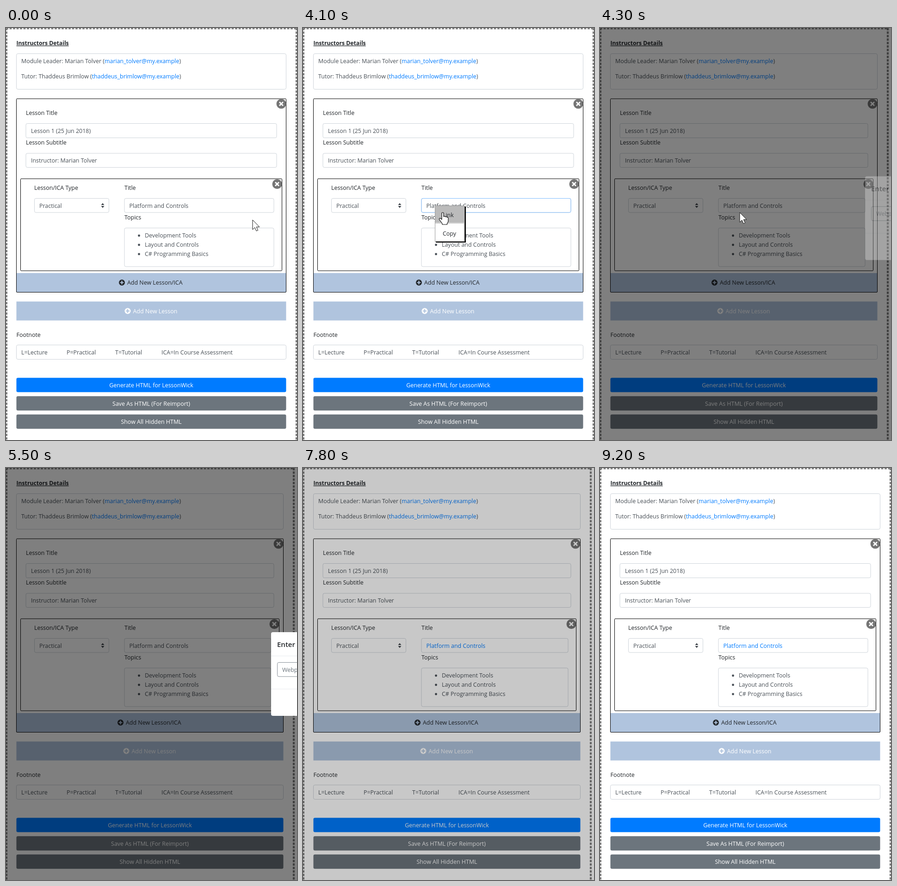
Write an HTML page that moves like this. It is 629 by 891 pixels and loops after 10000 ms.

```html
<!DOCTYPE html>
<html lang="en">
<head>
<meta charset="utf-8">
<title>Lesson editor</title>
<style>
html, body { margin: 0; width: 100%; height: 100%; overflow: hidden; background: #fff; }
svg { display: block; width: 629px; height: 891px; }
text { font: 12.45px "Open Sans", "Noto Sans", sans-serif; fill: #212529; white-space: pre; }
.mid { text-anchor: middle; }
.value { fill: #495057; }
.link { fill: #007bff; }
.light { fill: #fff; }
.head { font-size: 12.2px; font-weight: 700; text-decoration: underline; }
.modal-title { font-size: 15px; font-weight: 600; }
.hint { fill: #6c757d; }
</style>
</head>
<body>
<svg id="stage" viewBox="0 0 629 891"></svg>
<script>
const LOOP = 10000, STEP = 100;
const TITLE = "Platform and Controls";
const stage = document.getElementById("stage");

const text = (x, y, str, cls = "") => `<text x="${x}" y="${y}" class="${cls}">${str}</text>`;
const rect = (x, y, right, bottom, attrs) =>
  `<rect x="${x}" y="${y}" width="${right - x}" height="${bottom - y}" ${attrs}/>`;
const field = (x, y, right, bottom, stroke = "#ced4da") =>
  rect(x, y, right, bottom, `rx="3.3" fill="#fff" stroke="${stroke}"`);
const frame = (x, y, right, bottom) => rect(x, y, right, bottom, 'rx="1.5" fill="none" stroke="#000"');
const closeIcon = (x, y) => `<circle cx="${x}" cy="${y}" r="10.5" fill="#757575"/>
  <path d="M${x - 4} ${y - 4}l8 8m0-8l-8 8" stroke="#fff" stroke-width="2.8"/>`;
const plusIcon = (x, y, disc, cross) => `<circle cx="${x}" cy="${y}" r="6.5" fill="${disc}"/>
  <path d="M${x - 4} ${y}h8m-4-4v8" stroke="${cross}" stroke-width="2.2"/>`;

// The whole form; its right edge depends on whether the scroll bar is compensated.
function page(right) {
  const edge = right - .5, mid = (22 + right) / 2, steel = "#b0c4de";
  const button = (y, label, fill) =>
    rect(22.5, y, edge, y + 31, `rx="3.3" fill="${fill}"`) + text(mid, y + 20.3, label, "mid light");
  const person = (y, role, name, mail) =>
    text(33, y, `${role}: ${name} (<tspan class="link">${mail}</tspan>)`, "value");
  const topic = (label, i) =>
    `<circle cx="287.5" cy="${449 + i * 20}" r="2.4" fill="#495057"/>` + text(300, 453 + i * 20, label, "value");
  const notes = [[33, "L=Lecture"], [131, "P=Practical"], [236, "T=Tutorial"], [336, "ICA=In Course Assessment"]];
  return `
    <path d="M0 .6H${right + 24}M.9 0V891M${right + 22} 0V891" fill="none" stroke="#808080"
      stroke-width="4.2" stroke-dasharray="5 2.5"/>
    ${text(22.5, 37, "Instructors Details", "head")}
    ${field(22.5, 55.5, edge, 132.5)}
    ${person(76, "Module Leader", "Marian Tolver", "marian_tolver@my.example")}
    ${person(109, "Tutor", "Thaddeus Brimlow", "thaddeus_brimlow@my.example")}
    ${rect(22.5, 530, edge, 571.5, `fill="${steel}"`)}
    ${frame(22.5, 153, edge, 571.5)}
    ${closeIcon(right - 11, 164)}
    ${text(43, 188, "Lesson Title")}
    ${field(43, 206.5, right - 21, 237.5)}
    ${text(54, 227, "Lesson 1 (25 Jun 2018)", "value")}
    ${text(43, 252.3, "Lesson Subtitle")}
    ${field(43, 271, right - 21, 301.5)}
    ${text(54, 291, "Instructor: Marian Tolver", "value")}
    ${frame(31.5, 326, right - 9.5, 525)}
    ${text(61, 350, "Lesson/ICA Type")}
    ${field(61.5, 368.5, 222.5, 399)}
    ${text(72, 388.5, "Practical", "value")}
    <path d="M205.5 382.8l3.5-4 3.5 4zM205.5 385l3.5 4 3.5-4z" fill="#343a40"/>
    ${text(256, 350, "Title")}
    ${field(256, 368.5, right - 27, 399)}
    ${text(266.5, 388.5, TITLE, "value title")}
    ${text(256, 414.3, "Topics")}
    ${field(256, 432.5, right - 27, 516)}
    ${["Development Tools", "Layout and Controls", "C# Programming Basics"].map(topic).join("")}
    ${closeIcon(right - 20, 337.5)}
    ${plusIcon(mid - 63.5, 550.5, "#212529", steel)}
    ${text(mid - 52, 555.2, "Add New Lesson/ICA")}
    ${rect(22.5, 591.5, edge, 632.5, `fill="${steel}"`)}
    ${plusIcon(mid - 51, 612, "#fff", steel)}
    ${text(mid - 39.5, 617, "Add New Lesson", "light")}
    ${text(22.5, 667.5, "Footnote")}
    ${field(22.5, 685.5, edge, 716.5)}
    ${notes.map(([x, str]) => text(x, 706.3, str, "value")).join("")}
    ${button(756.5, "Generate HTML for LessonWick", "#007bff")}
    ${button(796.2, "Save As HTML (For Reimport)", "#6c757d")}
    ${button(835.8, "Show All Hidden HTML", "#6c757d")}`;
}

stage.innerHTML = `
  <defs><clipPath id="picked"><rect id="pickArea" y="375.5" height="17.5"/></clipPath></defs>
  <rect width="629" height="891" fill="#fff"/>
  <g id="wide">${page(606)}</g>
  <g id="narrow">${page(600)}</g>
  <g fill="none">
    <rect id="halo" x="254.7" y="367.2" width="325.6" height="33.1" rx="4.5" stroke="#007bff"
      stroke-opacity=".25" stroke-width="2.6"/>
    <rect id="ring" x="256" y="368.5" width="323" height="30.5" rx="3.3" stroke="#80bdff"/>
  </g>
  <g id="selection" clip-path="url(#picked)">
    ${rect(260, 375, 400, 394, 'fill="#3390ff"')}${text(266.5, 388.5, TITLE, "light")}
  </g>
  <g id="menu">
    ${rect(287, 386, 352, 464, 'fill="#000"')}
    ${rect(285.5, 384.5, 349, 461.5, 'fill="#fff" stroke="#999"')}
    <rect id="hover" x="286" y="385" width="62.5" height="36.5" fill="#bbb"/>
    <path d="M286 422.5H348.5" stroke="#ccc"/>
    ${text(302, 409, "Link")}${text(302, 449.3, "Copy")}
  </g>
  <rect id="shade" width="629" height="891"/>
  <g id="modal">
    ${rect(573, 355, 985, 536, 'rx="4" fill="#fff"')}
    ${text(586, 387, "Enter Webpage URL", "modal-title")}
    <path d="M573 406.5H985M573 478H985" stroke="#e9ecef"/>
    ${field(586.5, 420.5, 970, 451, "#868e96")}
    <g id="hint">${text(597, 440.8, "Webpage URL", "hint")}</g>
    <g id="typed">${text(597, 440.8, "https://", "value")}</g>
  </g>
  <g id="pointer" stroke-linejoin="round">
    <path id="arrow" d="M0 0V21L4.8 16.5 8.2 24 11.6 22.5 8.3 15.2H14.8Z" fill="#fff" stroke="#111"/>
    <path id="beam" d="M-2.7-6.5H-.6L0-6 .6-6.5H2.7M0-6V6.5M-2.7 7H-.6L0 6.5 .6 7H2.7" fill="none" stroke="#111" stroke-width="1.2"/>
    <path id="hand" d="M-2 15V2Q-2 0 0 0T2 2V9Q4 7 6 9.500 8 8 9.500 10.500 12 9.500 12 13V18Q12 21 9.500 24V26H-1V24L-7.500 15Q-8 12-5 12.500Z"
      fill="#fff" stroke="#111" stroke-width="1.2"/>
  </g>`;

const el = Object.fromEntries([...stage.querySelectorAll("[id]")].map(node => [node.id, node]));
const titles = [...stage.querySelectorAll(".title")];

const clamp = v => Math.min(1, Math.max(0, v));
const ramp = (t, start, length) => clamp((t - start) / length);
const smooth = p => p * p * (3 - 2 * p);
const easeOut = p => 1 - (1 - p) ** 1.8;
const show = (node, on) => node.setAttribute("display", on ? "inline" : "none");
const fade = (node, amount) => { show(node, amount > 0); node.setAttribute("opacity", amount); };

// Moments of the dialog's life, in ms
const OPEN = 4118, MODAL_IN = 4258, MODAL_OUT = 7565, SHADE_OUT = 7715, CLOSED = 7865;

// Pointer stops: time, x, y
const stops = [
  [0, 533, 415], [1200, 533, 415], [1800, 398, 386], [1950, 398, 386], [2350, 261, 388],
  [2700, 261, 388], [3000, 285, 384], [3100, 285, 384], [3400, 302, 399], [4500, 302, 399],
  [5100, 645, 440], [LOOP, 645, 440]
];
function pointerAt(t) {
  const i = stops.findIndex(stop => stop[0] > t);
  const [t0, x0, y0] = stops[i - 1], [t1, x1, y1] = stops[i];
  const p = smooth((t - t0) / (t1 - t0));
  return [x0 + (x1 - x0) * p, y0 + (y1 - y0) * p];
}

function draw(t) {
  const [x, y] = pointerAt(t);
  const menuOpen = t >= 3050 && t < OPEN;
  const modalUp = t >= OPEN && t < CLOSED;

  show(el.wide, !modalUp);
  show(el.narrow, modalUp);
  titles.forEach(node => node.setAttribute("class", t >= MODAL_OUT ? "link title" : "value title"));

  const focus = ramp(t, 1900, 150);
  fade(el.halo, focus * (1 - ramp(t, 3950, 150)));
  fade(el.ring, t < OPEN ? focus : 0);

  const pickFrom = Math.max(266.5, t < 2350 ? x : 0);
  show(el.selection, t >= 1950 && t < 4050);
  el.pickArea.setAttribute("x", pickFrom);
  el.pickArea.setAttribute("width", Math.max(0, 395 - pickFrom));

  const overMenu = menuOpen && x > 287;
  show(el.menu, menuOpen);
  show(el.hover, overMenu);

  fade(el.shade, .5 * ramp(t, OPEN, 150) * (1 - ramp(t, SHADE_OUT, 150)));
  fade(el.modal, ramp(t, MODAL_IN, 150) * (1 - ramp(t, MODAL_OUT, 150)));
  const lift = 45 * (1 - easeOut(ramp(t, MODAL_IN, 300)) + easeOut(ramp(t, MODAL_OUT, 300)));
  el.modal.setAttribute("transform", `translate(0 ${-lift})`);
  show(el.hint, t < 7000);
  show(el.typed, t >= 7000);

  const overField = !menuOpen && !modalUp && x > 256 && x < 579 && y > 368 && y < 399;
  el.pointer.setAttribute("transform", `translate(${x} ${y})`);
  show(el.beam, overField);
  show(el.hand, overMenu);
  show(el.arrow, !overField && !overMenu);
}

const start = performance.now();
function tick() {
  const t = (performance.now() - start) % LOOP;
  draw(Math.floor(t / STEP) * STEP);
  requestAnimationFrame(tick);
}
tick();
</script>
</body>
</html>
```
